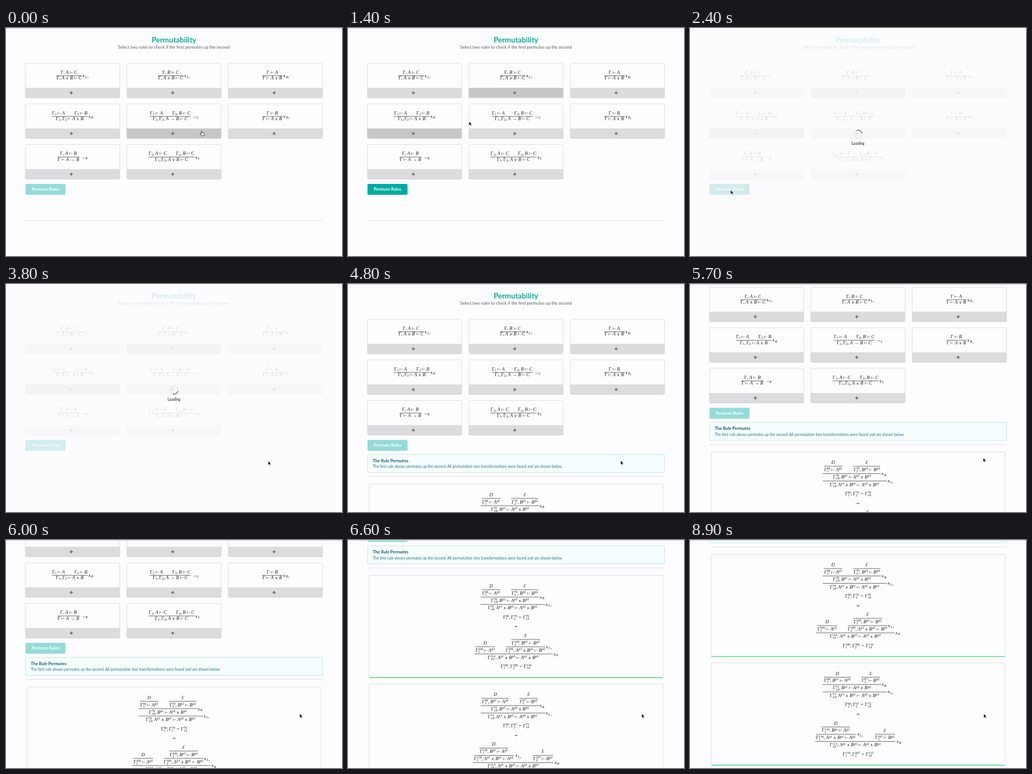
Write an HTML page that moves like this. It is 600 px wide and 408 px high and loops after 9500 ms.

```html
<!DOCTYPE html>
<html lang="en">
<head>
<meta charset="utf-8">
<title>Permutability</title>
<style>
html, body { margin: 0; width: 100%; height: 100%; overflow: hidden; background: #fdfcfe; }
svg { display: block; width: 600px; height: 408px; font-family: Lato, sans-serif; }
.math { fill: #1c1c1e; text-anchor: middle; font-family: "Liberation Serif", serif; }
.var { font-style: italic; }
.sym { font-family: "DejaVu Sans", sans-serif; }
.rule { stroke: #1c1c1e; stroke-width: .65; }
.mid { text-anchor: middle; }
.bold { font-weight: 700; }
.card { fill: #fdfcfe; stroke: #d2d1d5; stroke-width: .7; }
.icon { stroke: #626165; stroke-width: 1.5; }
</style>
</head>
<body>
<svg id="stage" viewBox="0 0 600 408"></svg>
<script>
const LOOP = 9500, STEP = 100, EM = 8;
const TEAL = '#00aba1', BAR = '#dcdbde', BAR_ON = '#c7c6c9';

function el(tag, attrs, parent, text) {
  const node = document.createElementNS('http://www.w3.org/2000/svg', tag);
  for (const key in attrs) node.setAttribute(key, attrs[key]);
  if (text) node.textContent = text;
  parent.append(node);
  return node;
}

const stage = document.getElementById('stage');
const page = el('g', {}, stage);

// --- Math typesetting -------------------------------------------------
// Per symbol: [advance, space on each side] in em
const METRICS = {
  'Γ': [.625, 0], A: [.75, 0], B: [.76, 0], C: [.715, 0], ',': [.278, 0],
  '∧': [.667, .222], '∨': [.667, .222], '⊢': [.611, .278], '→': [1, .278], '=': [.778, .278]
};
const SMALL = .354;

function glyph(text, ch, x, y, size) {
  const sym = /[∧∨⊢⇝]/.test(ch);
  const cls = sym ? 'sym' : /[A-Zp\u0190]/.test(ch) ? 'var' : '';
  el('tspan', { x: x.toFixed(2), y: y.toFixed(2), 'font-size': sym ? size * .86 : size * 1.05, class: cls }, text, ch);
}

function parse(src) {
  return [...src.matchAll(/([^\s_^\w]|[ABC])(?:_(\d+))?(?:\^(\w+))?/g)].map(([, ch, sub = '', sup = '']) => {
    const [w, pad] = METRICS[ch];
    const scripts = Math.max(sub.length, sup.length) * SMALL;
    return { ch, sub, sup, w, pad, full: w + 2 * pad + scripts + (ch === ',' ? .167 : 0) };
  });
}

const widthOf = src => parse(src).reduce((sum, t) => sum + t.full, 0) * EM;

function formula(g, src, cx, y) {
  const text = el('text', { class: 'math' }, g);
  let x = cx - widthOf(src) / 2;
  for (const t of parse(src)) {
    glyph(text, t.ch, x + (t.pad + t.w / 2) * EM, y, EM);
    const scripts = (str, dy) => [...str].forEach((ch, i) =>
      glyph(text, ch, x + (t.w + (i + .5) * SMALL) * EM, y + dy, EM * .69));
    scripts(t.sub, t.sup ? 2.1 : 1.2);
    scripts(t.sup, -2.9);
    x += t.full * EM;
  }
}

function label(g, name, x, y) {
  const text = el('text', { class: 'math' }, g);
  const [op, side, index] = name;
  const w = op === '→' ? 7.6 : 5.4;
  glyph(text, op, x + w / 2, y, EM);
  glyph(text, side, x + w + 2, y + 1.4, EM * .7);
  if (index) glyph(text, index, x + w + 5, y + 2.3, EM * .5);
}

const rule = (g, x1, x2, y) => el('line', { class: 'rule', x1, x2, y1: y, y2: y }, g);

function mark(g, ch, x, y) {
  glyph(el('text', { class: 'math' }, g), ch, x, y, EM);
}

// --- Header -----------------------------------------------------------
el('text', { class: 'mid bold', x: 300, y: 26.3, 'font-size': 13.26, fill: TEAL }, page, 'Permutability');
el('text', { class: 'mid', x: 300, y: 37.2, 'font-size': 7.58, fill: '#59595b' }, page,
  'Select two rules to check if the first permutes up the second');

// --- Rule cards: premises, conclusion, name, centre -------------------
const RULES = [
  [['Γ,A⊢C'], 'Γ,A∧B⊢C', '∧L1', 112.5],
  [['Γ,B⊢C'], 'Γ,A∧B⊢C', '∧L2', 294],
  [['Γ⊢A'], 'Γ⊢A∨B', '∨R1', 475.7],
  [['Γ_1⊢A', 'Γ_2⊢B'], 'Γ_1,Γ_2⊢A∧B', '∧R', 114],
  [['Γ_1⊢A', 'Γ_2,B⊢C'], 'Γ_1,Γ_2,A→B⊢C', '→L', 293.3],
  [['Γ⊢B'], 'Γ⊢A∨B', '∨R2', 475.7],
  [['Γ,A⊢B'], 'Γ⊢A→B', '→R', 111.7],
  [['Γ_1,A⊢C', 'Γ_2,B⊢C'], 'Γ_1,Γ_2,A∨B⊢C', '∨L', 295.5]
];
const CARD_W = 168.6, CARD_H = 61.7, GAP = 16.6;

const cards = RULES.map(([tops, bottom, name, cx], i) => {
  const x = 34.6 + (i % 3) * 181.1, y = 63.1 + Math.floor(i / 3) * 72.7;
  const g = el('g', {}, page);
  el('rect', { class: 'card', x, y, width: CARD_W, height: CARD_H, rx: 2 }, g);
  const bar = el('path', { d: `M${x} ${y + 44}h${CARD_W}v15.7q0 2-2 2h${4 - CARD_W}q-2 0-2-2z` }, g);
  el('path', { d: `M${x + 1} ${y + CARD_H}h${CARD_W - 2}`, stroke: '#c9c8cc', 'stroke-width': .6 }, g);
  const icon = el('path', { class: 'icon', d: 'M-2.8 0H2.8M0-2.8V2.8' }, g);

  const widths = tops.map(widthOf);
  const total = widths.reduce((a, b) => a + b) + GAP * (tops.length - 1);
  let left = cx - total / 2;
  tops.forEach((src, k) => {
    formula(g, src, left + widths[k] / 2, y + 18.9);
    left += widths[k] + GAP;
  });
  formula(g, bottom, cx, y + 29.2);
  const half = Math.max(total, widthOf(bottom)) / 2 + .4;
  rule(g, cx - half, cx + half, y + 22.4);
  label(g, name, cx + half + (name[0] === '→' ? 2.6 : .6), y + 25);
  return { x, y, bar, icon, at: `translate(${x + 82} ${y + 53})` };
});

// --- Button, message, divider -----------------------------------------
const button = el('g', {}, page);
const face = el('rect', { x: 34.8, y: 279, width: 71.5, height: 19.4, rx: 2 }, button);
el('text', { class: 'mid bold', x: 70.6, y: 291.4, 'font-size': 7.58, fill: '#fff' }, page, 'Permute Rules');
el('rect', { x: 35, y: 344.3, width: 531, height: .8, fill: '#dcdbde' }, page);

const results = el('g', {}, page);
el('rect', { x: 35, y: 305.2, width: 530.5, height: 32.2, rx: 2, fill: '#f6fefe', stroke: '#aedcdd', 'stroke-width': .7 }, results);
el('text', { class: 'bold', x: 44.2, y: 318.8, 'font-size': 7.58, fill: '#0e566c' }, results, 'The Rule Permutes');
el('text', { x: 44.2, y: 329.4, 'font-size': 6.63, fill: '#276f86' }, results,
  'The first rule always permutes up the second. All permutation tree transformations were found and are shown below.');

// --- Derivation trees (coordinates relative to the panel top) ---------
const FULL = 'A^p1∧B^p1⊢A^p2∧B^p2';

function panel(top, before, after, draw) {
  const g = el('g', { transform: `translate(0 ${top})` }, results);
  el('rect', { class: 'card', x: 37.8, y: 0, width: 524.7, height: 183, rx: 2 }, g);
  el('rect', { x: 38, y: 182.3, width: 524.3, height: 1.5, rx: .7, fill: '#50dc78' }, g);
  const equation = ([a, b, c], y) => formula(g, `Γ_1^${a},Γ_2^${b}=Γ_14^${c}`, 300, y);
  draw(g);
  rule(g, 237, 341.3, 38.8);
  label(g, '∧R', 341.5, 41.6);
  formula(g, `Γ_14^${before[2]},B^p1⊢A^p2∧B^p2`, 289.3, 47.6);
  rule(g, 237, 352, 52);
  label(g, '∧L1', 352, 54.6);
  formula(g, `Γ_14^${before[2]},${FULL}`, 293.7, 61);
  equation(before, 77.6);
  mark(g, '⇝', 299.6, 94);
  formula(g, `Γ_14^${after[2]},${FULL}`, 295, 149.6);
  equation(after, 166);
}

// A premise with its sub-derivation letter above the rule
function leaf(g, letter, src, cx, y) {
  const half = widthOf(src) / 2 + .7;
  mark(g, letter, cx, y - 12.8);
  rule(g, cx - half, cx + half, y - 8.9);
  formula(g, src, cx, y);
}
const D = 'D', E = '\u0190';

panel(358, [66, 70, 76], [106, 160, 116], g => {
  leaf(g, D, 'Γ_1^66⊢A^p2', 255.6, 34.5);
  leaf(g, E, 'Γ_2^70,B^p1⊢B^p2', 315.6, 34.5);
  leaf(g, E, 'Γ_2^160,B^p1⊢B^p2', 317.2, 123.6);
  leaf(g, D, 'Γ_1^106⊢A^p2', 244.8, 136.6);
  rule(g, 281.6, 352.4, 127.8);
  label(g, '∧L1', 352.8, 130.6);
  formula(g, 'Γ_2^160,A^p1∧B^p1⊢B^p2', 317, 136.6);
  rule(g, 225.5, 365.5, 140.6);
  label(g, '∧R', 366, 143.4);
});
panel(552.4, [69, 67, 73], [134, 107, 113], g => {
  leaf(g, D, 'Γ_1^69,B^p1⊢A^p2', 263, 34.5);
  leaf(g, E, 'Γ_2^67⊢B^p2', 322.5, 34.5);
  leaf(g, D, 'Γ_1^134,B^p1⊢A^p2', 260.3, 123.6);
  leaf(g, E, 'Γ_2^107⊢B^p2', 348, 136.6);
  rule(g, 225, 296, 127.8);
  label(g, '∧L1', 298, 130.6);
  formula(g, 'Γ_1^134,A^p1∧B^p1⊢A^p2', 260.3, 136.6);
  rule(g, 223.5, 367, 140.6);
  label(g, '∧R', 368, 143.4);
});

// --- Fixed layers: window edge, loader, pointer -----------------------
el('rect', { width: 600, height: 1.3, fill: '#d6d5d9' }, stage);

const dimmer = el('g', {}, stage);
el('rect', { width: 600, height: 408, fill: '#fdfcfe', opacity: .83 }, dimmer);
el('circle', { cx: 300, cy: 190, r: 7, fill: 'none', stroke: '#dcdcde', 'stroke-width': 1.2 }, dimmer);
const spinner = el('path', { d: 'M-4.95-4.95A7 7 0 0 1 4.95-4.95', fill: 'none', stroke: '#6b6b6e', 'stroke-width': 1.3, 'stroke-linecap': 'round' }, dimmer);
el('text', { class: 'mid', x: 300, y: 209, 'font-size': 6.63, fill: '#111' }, dimmer, 'Loading');

const arrow = el('path', { d: 'M0 0V7.2L1.7 5.7 2.8 8.2 4 7.7 2.9 5.2H5.2Z', fill: '#000', stroke: '#fff', 'stroke-width': .5 }, stage);
const hand = el('path', {
  d: 'M-.9 .6Q0-.5 .8 .6V3.2Q1.6 2.6 2.2 3.4 3 2.9 3.5 3.7 4.5 3.4 4.7 4.3V6Q4.4 7.4 3.8 8.4H-.4Q-1.4 6.8-2.6 5.2-2.6 4.2-1.6 4.5L-.9 5.1Z',
  fill: '#fff', stroke: '#111', 'stroke-width': .75, 'stroke-linejoin': 'round'
}, stage);

// --- Timeline: [ms, values...] ----------------------------------------
const POINTER = [
  [0, 349.5, 184.5], [500, 160, 185], [700, 160, 185], [1000, 325, 114], [1100, 325, 114],
  [1500, 180, 185], [1800, 72.5, 290], [2600, 72.5, 290], [3000, 250, 313], [3500, 440, 318],
  [4000, 487, 316], [5000, 487, 316], [5300, 522, 311.5], [5900, 524.5, 311]
];
const SCROLL = [
  [5000, 0], [5200, 6], [5500, 40.5], [5800, 66], [6000, 95], [6100, 140], [6200, 180],
  [6300, 205], [6400, 205], [6500, 245], [6600, 294.7], [6700, 315], [6800, 325], [7000, 332.5]
];
const DIM = [[2000, 0], [2400, 1], [4100, 1], [4500, 0]];
const PICKS = { 3: 600, 1: 1100 }, DONE = 3900;

function sample(keys, t) {
  const i = keys.findIndex(k => k[0] > t);
  if (i < 0) return keys[keys.length - 1].slice(1);
  if (i === 0) return keys[0].slice(1);
  const a = keys[i - 1], b = keys[i], p = (t - a[0]) / (b[0] - a[0]);
  return a.slice(1).map((v, k) => v + (b[k + 1] - v) * p);
}

const inside = (x, y, left, top, w, h) => x > left && x < left + w && y > top && y < top + h;

function render(t) {
  const [px, py] = sample(POINTER, t), [scroll] = sample(SCROLL, t), [dim] = sample(DIM, t);
  const live = dim === 0;
  let over = false;

  page.setAttribute('transform', `translate(0 ${-scroll})`);
  cards.forEach((c, i) => {
    const hover = live && inside(px, py + scroll, c.x, c.y + 44, CARD_W, 18);
    const picked = t >= PICKS[i] && t < DONE;
    over = over || hover;
    c.bar.setAttribute('fill', hover || picked ? BAR_ON : BAR);
    c.icon.setAttribute('transform', c.at + (picked ? ' rotate(45)' : ''));
  });

  const enabled = t >= PICKS[1] && t < DONE;
  const onButton = enabled && inside(px, py + scroll, 34.8, 279, 71.5, 19.4);
  over = over || (live && onButton);
  face.setAttribute('fill', onButton ? '#009c95' : TEAL);
  button.setAttribute('opacity', enabled ? 1 : .41);
  results.setAttribute('visibility', t >= DONE ? 'visible' : 'hidden');

  dimmer.setAttribute('opacity', dim);
  spinner.setAttribute('transform', `translate(300 190) rotate(${t * .6 % 360 + 30})`);

  for (const [shape, shown] of [[hand, over], [arrow, !over]]) {
    shape.setAttribute('visibility', shown ? 'visible' : 'hidden');
    shape.setAttribute('transform', `translate(${px} ${py})`);
  }
}

const start = performance.now();
function tick() {
  const t = (performance.now() - start) % LOOP;
  render(Math.floor(t / STEP) * STEP);
  requestAnimationFrame(tick);
}
tick();
</script>
</body>
</html>
```
